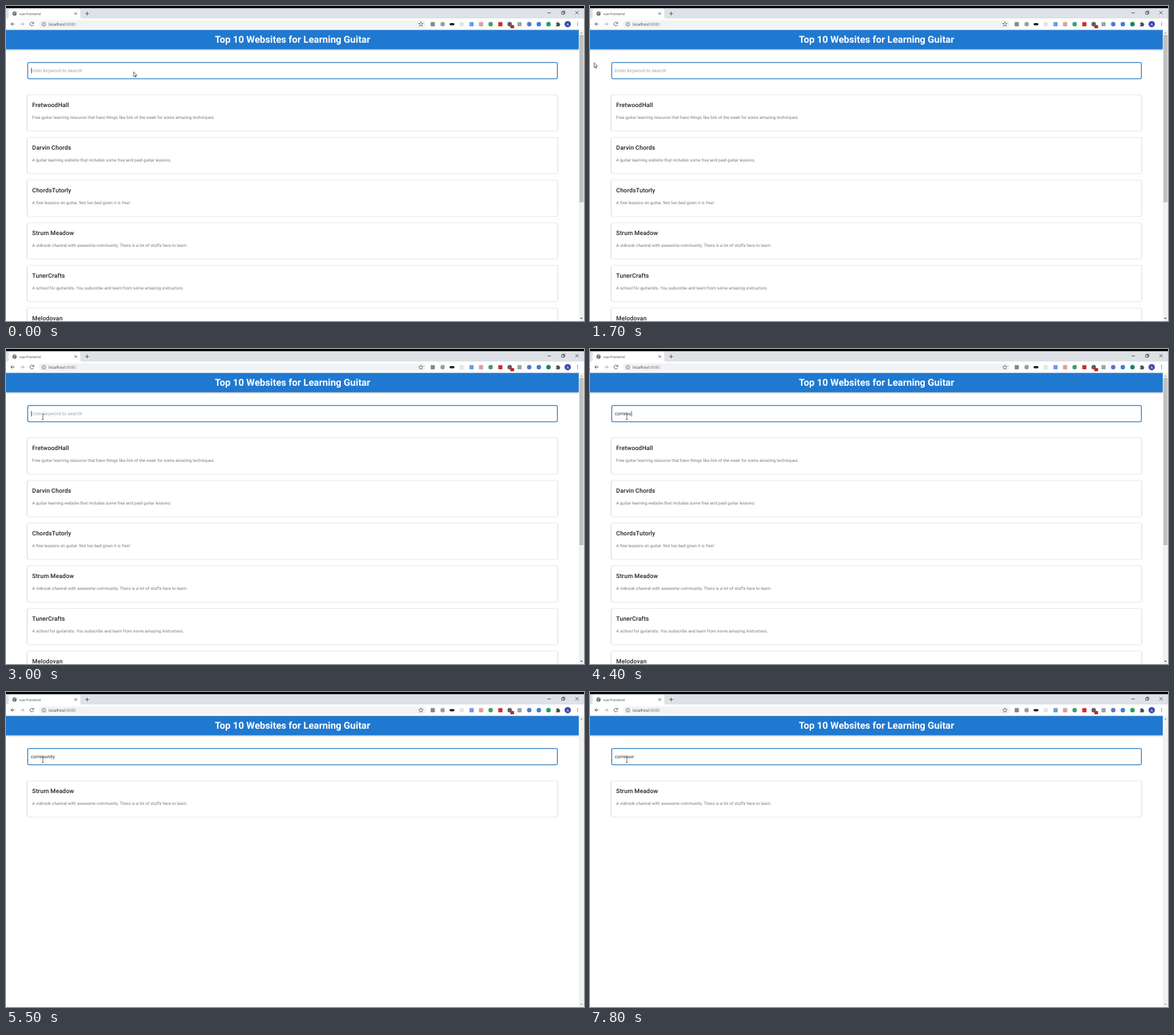
An HTML page for the animation above (8000 ms loop, 879 by 480 pixels).

```html
<!DOCTYPE html>
<html lang="en">
<head>
<meta charset="utf-8">
<title>vue-frontend</title>
<style>
  html, body { margin: 0; width: 100%; height: 100%; overflow: hidden; background: #fff; }
  svg { display: block; width: 100%; height: 100%; font-family: Roboto, sans-serif; text-rendering: geometricPrecision; }
  .ui { font-family: "Open Sans", sans-serif; }
  .line { fill: none; stroke: #4b4f54; stroke-width: .9; }
  .bar { filter: drop-shadow(0 1px 1px rgba(0,0,0,.35)); }
  .card rect { fill: #fff; filter: drop-shadow(0 .5px .5px rgba(0,0,0,.3)) drop-shadow(0 .5px .8px rgba(0,0,0,.22)); }
  .name { font-size: 9.16px; font-weight: 500; letter-spacing: .0125em; fill: #212121; }
  .about { font-size: 6.41px; letter-spacing: .00714em; fill: #777; }
  .field { font-size: 7.32px; }
</style>
</head>
<body>
<svg viewBox="0 0 879 480" preserveAspectRatio="none">
  <rect width="879" height="480" fill="#fff"/>

  <!-- browser tabs and toolbar -->
  <rect width="879" height="19" fill="#dee1e6"/>
  <rect width="879" height="3.3" fill="#000"/>
  <path d="M2 19q2 0 2-2V7q0-3 3-3H110q3 0 3 3V17q0 2 2 2z" fill="#fff"/>
  <circle cx="13" cy="11.5" r="3.2" fill="#5f6368"/>
  <path d="M10.4 10.3l2 .7 .6 1.5 -1 1.5M13 8.7l.7 1.4 1.8.6" class="line" style="stroke:#fff;stroke-width:.7"/>
  <text x="20" y="13.5" class="ui" font-size="5.4" fill="#45494d">vue-frontend</text>
  <g class="line">
    <path d="M104.2 9.7l3.6 3.6m0-3.6l-3.6 3.6M120.7 11.5h5.6m-2.8-2.8v5.6"/>
    <path d="M823.5 10.5h5.2M845 9h3.6v3.6H845zM846.2 9V7.9h3.6v3.6h-1.2M866 8l4.6 4.6m0-4.6L866 12.600" stroke="#222" stroke-width=".7"/>
  </g>
  <rect x="50" y="22" width="589" height="11.5" rx="5.7" fill="#f1f3f4"/>
  <g class="line">
    <path d="M13 27.500H7.500m2.700-2.700L7.500 27.500l2.700 2.700"/>
    <path d="M22 27.500h5.500m-2.700-2.700l2.700 2.700-2.700 2.700" stroke="#a9acb0"/>
    <path d="M41.600 25.800a2.800 2.800 0 1 0 .4 2.500M42.200 24.300v2.200H40"/>
    <circle cx="57.500" cy="27.700" r="2.800" stroke-width=".7"/>
    <path d="M57.500 27.400v1.800m0-3.200v.7" stroke-width=".7"/>
    <path d="M631 24.300l1 2.200 2.400.2-1.800 1.600.5 2.400-2.100-1.300-2.100 1.300.5-2.400-1.800-1.600 2.400-.2z" stroke-width=".7"/>
  </g>
  <text x="65" y="29.900" class="ui" font-size="6.1" fill="#33363a">localhost<tspan fill="#74787c">:8080</tspan></text>

  <g id="icons"></g>
  <rect x="767" y="29" width="5.700" height="5" rx="1" fill="#c62828"/>
  <circle cx="854.200" cy="27.700" r="4.800" fill="#3949ab"/>
  <text x="854.200" y="29.700" font-size="5.500" fill="#fff" text-anchor="middle">A</text>
  <g fill="#4b4f54">
    <path d="M836.500 25.700h1.600a1.100 1.100 0 0 1 2.200 0h1.600v1.700a1.100 1.100 0 0 1 0 2.200v1.500h-5.400v-1.600a1 1 0 0 0 0-2z"/>
    <circle cx="869.200" cy="25.300" r=".7"/><circle cx="869.200" cy="27.700" r=".7"/><circle cx="869.200" cy="30.100" r=".7"/>
  </g>

  <!-- page -->
  <rect class="bar" y="36.500" width="871" height="29.300" fill="#2079d0"/>
  <text x="435.600" y="56" font-size="14.65" font-weight="700" fill="#fff" text-anchor="middle">Top 10 Websites for Learning Guitar</text>
  <rect x="33" y="86.200" width="805.500" height="24.600" rx="1.800" fill="#fff" stroke="#2c7cc4" stroke-width="1.300"/>
  <text id="field" class="field" x="37.700" y="100.700"></text>
  <rect id="caret" y="94.300" width=".7" height="8.600" fill="#333"/>
  <g id="cards"></g>

  <!-- scrollbar -->
  <rect x="871.200" y="36.500" width="7.800" height="443.500" fill="#f1f1f1"/>
  <rect id="thumb" x="872" y="44" width="6.300" height="255" fill="#c1c1c1"/>
  <path id="up" d="M873.200 42l1.900-2.200 1.900 2.200z" fill="#a3a3a3"/>
  <path id="down" d="M873.200 475l1.900 2.200 1.900-2.200z" fill="#505050"/>

  <path id="arrow" d="M0 0V7.300L1.700 5.800 2.800 8.400 3.900 7.900 2.800 5.400H5z" fill="#fff" stroke="#222" stroke-width=".7"/>
  <path id="beam" d="M-1.700-4H-.5Q0-4 0-3.400Q0-4 .5-4H1.700M0-3.400V3.400M-1.700 4H-.5Q0 4 0 3.400Q0 4 .5 4H1.700" fill="none" stroke="#333" stroke-width=".7"/>
</svg>
<script>
const LOOP = 8000, FILTERED = 5500;
const $ = id => document.getElementById(id);
const show = (id, on) => $(id).setAttribute('visibility', on ? 'visible' : 'hidden');

// Extension buttons: centre, colour, shape
const icons = [
  [649, '#85888c', 'square'], [664, '#9a9da1', 'circle'], [678.3, '#222', 'flat'],
  [693, '#e4e5e7', 'square'], [708, '#6e9be0', 'square'], [722.5, '#d9a09c', 'square'],
  [737, '#3f9f72', 'circle'], [751.800, '#d32f2f', 'square'], [766, '#5c6064', 'circle'],
  [781, '#a0a3a6', 'square'], [795.700, '#5279c7', 'circle'], [810.300, '#4779cf', 'circle'],
  [825, '#17a45b', 'circle']
];
const sizes = { square: [6.400, 6.400, 1], circle: [6.800, 6.800, 3.400], flat: [7.600, 3.600, 1.800] };
$('icons').innerHTML = icons.map(([x, color, shape]) => {
  const [w, h, r] = sizes[shape];
  return `<rect x="${x - w / 2}" y="${27.700 - h / 2}" width="${w}" height="${h}" rx="${r}" fill="${color}"/>`;
}).join('');
const status = $('icons').lastChild;

const sites = [
  ['FretwoodHall', 'Free guitar learning resource that have things like lick of the week for some amazing techniques.'],
  ['Darvin Chords', 'A guitar learning website that includes some free and paid guitar lessons.'],
  ['ChordsTutorly', 'A free lessons on guitar. Not too bad given it is free!'],
  ['Strum Meadow', 'A vidnook channel with awesome community. There is a lot of stuffs here to learn.'],
  ['TunerCrafts', 'A school for guitarists. You subscribe and learn from some amazing instructors.'],
  ['Melodovan', '']
];
$('cards').innerHTML = sites.map(([name, about]) => `<g class="card">
  <rect x="32.500" y="136" width="806.300" height="54" rx="1.800"/>
  <text class="name" x="39.800" y="154">${name}</text>
  <text class="about" x="39.800" y="172.200">${about}</text></g>`).join('');
const cards = [...$('cards').children];

// Time of each keystroke, then of each backspace
const word = 'community';
const typed = [3700, 3800, 4000, 4200, 4400, 4500, 4700, 4800, 5000];
const erased = [7500, 7600, 7700];
const count = (times, t) => times.filter(at => at <= t).length;

// Pointer path: time, x, y
const path = [
  [0, 194, 100.300], [800, 196.700, 102], [1200, 196.700, 102], [1700, 6.300, 86.500],
  [1850, 6.300, 86.500], [2300, 30, 103], [2500, 34, 98.500], [2850, 34, 98.500], [3000, 56, 103.400]
];
function pointer(t) {
  const i = path.findIndex(p => p[0] > t);
  if (i < 0) return path[path.length - 1].slice(1);
  const [t0, x0, y0] = path[i - 1], [t1, x1, y1] = path[i];
  const k = (t - t0) / (t1 - t0);
  return [x0 + (x1 - x0) * k, y0 + (y1 - y0) * k];
}

function caretOn(t) {
  if (t < 3500) return (t + 100) % 1000 < 500;
  if (t < 3700) return false;
  if (t < 5500) return true;
  return t >= 6000 && t < 6600 || t >= 7000 && t < 7750;
}

let last;
function filter(on) {
  if (on === last) return;
  last = on;
  let row = 0;
  cards.forEach((card, i) => {
    const match = !on || sites[i][1].includes(word);
    card.style.display = match ? '' : 'none';
    if (match) card.setAttribute('transform', `translate(0 ${65 * row++})`);
  });
  show('thumb', !on);
  $('down').setAttribute('fill', on ? '#a3a3a3' : '#505050');
}

function draw(now) {
  const t = now % LOOP;
  const text = word.slice(0, count(typed, t) - count(erased, t));
  const field = $('field');
  field.textContent = text || 'Enter keyword to search';
  field.setAttribute('fill', text ? '#333' : '#a5a5a5');
  $('caret').setAttribute('x', 38 + (text ? field.getComputedTextLength() : 0));
  show('caret', caretOn(t));
  filter(t >= FILTERED);

  const [x, y] = pointer(t), typing = t >= 2900;
  for (const id of ['arrow', 'beam']) $(id).setAttribute('transform', `translate(${x} ${y})`);
  show('arrow', !typing);
  show('beam', typing);
  status.setAttribute('fill', t >= 1300 && t < 5200 ? '#168560' : '#17a45b');
  requestAnimationFrame(() => draw(performance.now() - start));
}
const start = performance.now();
draw(0);
</script>
</body>
</html>
```
